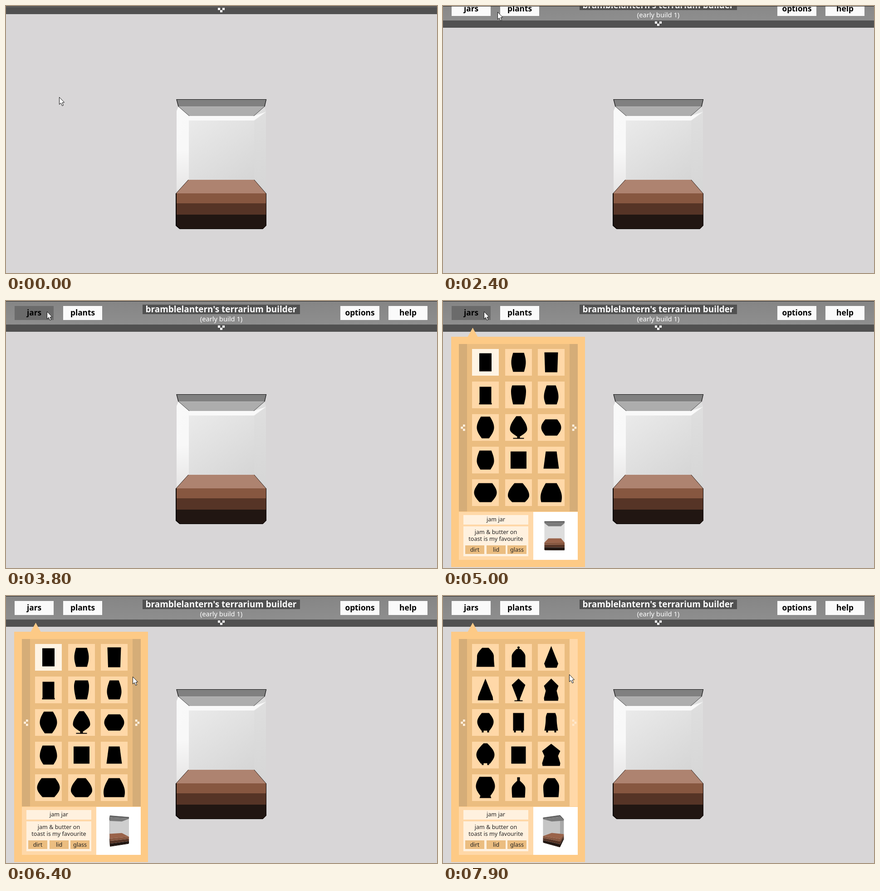
These frames come from a looping animation (950x590 px, 8 s). An HTML page with a canvas:

```html
<!DOCTYPE html>
<html lang="en">
<head>
<meta charset="utf-8">
<title>Terrarium builder</title>
<style>
html, body { margin: 0; width: 950px; height: 590px; overflow: hidden; }
canvas { display: block; }
</style>
</head>
<body>
<canvas id="stage" width="950" height="590"></canvas>
<script>
const ctx = document.getElementById('stage').getContext('2d');
const FONT = '"Noto Sans", "Open Sans", sans-serif';
const QUARTER = Math.PI / 2;

function rect(x0, y0, x1, y1, fill) {
  ctx.fillStyle = fill;
  ctx.fillRect(x0, y0, x1 - x0, y1 - y0);
}

function trace(points) {
  ctx.beginPath();
  points.forEach(([x, y]) => ctx.lineTo(x, y));
}

function poly(fill, ...points) {
  trace(points);
  ctx.closePath();
  ctx.fillStyle = fill;
  ctx.fill();
}

function line(color, width, ...points) {
  trace(points);
  ctx.strokeStyle = color;
  ctx.lineWidth = width;
  ctx.stroke();
}

function fade(x0, y0, x1, y1, ...colors) {
  const g = ctx.createLinearGradient(x0, y0, x1, y1);
  colors.forEach((c, i) => g.addColorStop(i / (colors.length - 1), c));
  return g;
}

function label(str, x, y, size, weight = 400, color = '#000') {
  ctx.font = `${weight} ${size}px ${FONT}`;
  ctx.textAlign = 'center';
  ctx.fillStyle = color;
  ctx.fillText(str, x, y);
}

// Arrowhead of three square dots, pointing along (dx, dy) from its centre
function chevron(x, y, size, dx, dy, color) {
  for (const side of [-1, 0, 1]) {
    const along = side ? -.5 : .5;
    const cx = x + size * (along * dx + side * dy), cy = y + size * (along * dy + side * dx);
    rect(cx - size / 2, cy - size / 2, cx + size / 2, cy + size / 2, color);
  }
}

// Jar parts are right-hand outlines, as [half-width, y] from the cell centre
const box = (top, bottom = top, h = 20) => [[top, -h], [bottom, h]];

function pot(neck, belly, base = neck, peak = .5, top = -21, bottom = 21) {
  const points = [];
  for (let v = 0; v <= 1.001; v += .05) {
    const w = v < peak
      ? neck + (belly - neck) * Math.sin(QUARTER * v / peak)
      : base + (belly - base) * Math.cos(QUARTER * (v - peak) / (1 - peak));
    points.push([w, top + (bottom - top) * v]);
  }
  return points;
}

const spire = (w, base, widest) => [[0, -25], [w, widest], [base, 23]];
const house = w => [[0, -25], [w, -9], [w * .75, 2], [w, 18], [w * .95, 24]];
const feet = w => [[w, 18], [w, 22], [w - 4, 22], [w - 4, 18]];
const stem = w => [[3, 20], [3, 23], [w, 23], [w, 25]];
const lip = w => [[w, 18], [w, 21]];
const knob = [[1, -24], [3, -22], [1, -19]];

const plainJars = [
  box(13.5), pot(12, 16), box(15, 13.5, 22),
  [...box(13, 13, 18), ...lip(14)], pot(14, 16.5, 12, .3), pot(10, 16, 12, .6),
  pot(10, 19, 8, .5, -24, 24), [...pot(5, 19, 3, .65, -25, 20), ...stem(12)], pot(13, 22, 13, .5, -18, 18),
  pot(13, 19, 11, .55), box(17.5, 17.5, 19), box(12, 17, 19),
  pot(15, 25, 13), pot(9, 23.5, 14, .65), pot(12, 23.5, 22, .75),
];

const fancyJars = [
  pot(7, 18.5, 20, .45), [...knob, ...pot(5, 15, 15, .4, -18, 22)], spire(15.5, 12, 14),
  spire(16, 17, 15), [...spire(15, 5, -11).slice(0, 2), ...stem(9)], house(16),
  [...pot(8, 18, 9, .5, -21, 18), ...feet(8)], [...box(12, 12, 21).slice(0, 1), [12, 18], ...feet(10)],
  [...pot(9, 12, 15, .3, -21, 18), ...feet(11)],
  [...pot(4, 20, 9, .55, -26, 20), ...feet(8)], box(16, 16, 19), house(20),
  [...pot(13, 21, 11, .5, -24, 18), [13, 23]], [[3, -23], ...pot(3, 15, 14, .45, -15, 22)], pot(8, 17.5, 16, .45),
];

const mixedJars = plainJars.map((jar, i) => i % 2 ? fancyJars[i] : jar).reverse();

function silhouette(jar, cx, cy) {
  const half = side => jar.map(([w, y]) => [cx + side * w, cy + y]);
  poly('#000', ...half(1), ...half(-1).reverse());
}

function mainJar() {
  // Glass
  poly(fade(0, 222, 0, 414, '#f9f9f9', '#f8f8f8', '#e6e5e5'),
    [380, 222], [404, 243], [403, 384], [376, 413], [376, 232]);
  poly(fade(0, 222, 0, 414, '#dfdfdf', '#d6d6d6'),
    [570, 222], [546, 243], [547, 384], [573, 413], [573, 232]);
  rect(403, 243, 547, 384, fade(420, 243, 530, 400, '#eaeaea', '#d5d5d5'));
  poly('#f9f9f9', [403, 243], [546, 243], [573, 234], [547, 253], [403, 253]);
  // Lid
  poly('#adadad', [380, 222], [570, 222], [546, 243], [404, 243]);
  poly('#808080', [376, 206], [573, 206], [570, 222], [380, 222]);
  line('#bcbcbc', 1, [381, 222.5], [569, 222.5]);
  line('#444', 1, [404, 243], [380, 222]);
  line('#444', 1, [570, 222], [546, 243]);
  line('#111', 1.2, [380, 222], [376, 206.5], [573.5, 206.5], [570, 222]);
  // Soil
  poly('#ae8370', [402, 384], [547, 384], [573, 414], [375, 414]);
  line('#2a1c16', 1, [402, 384], [375, 414]);
  line('#2a1c16', 1, [547, 384], [573, 414]);
  rect(375, 414, 574, 436, '#875740');
  rect(375, 436, 574, 461, '#563426');
  poly('#211612', [375, 461], [574, 461], [574, 485], [566, 493], [383, 493], [375, 485]);
  line('#0a0706', 2, [375, 414], [375, 485], [383, 492]);
  line('#0a0706', 1, [383, 492.5], [566, 492.5], [573.5, 485], [573.5, 414]);
}

function preview(t) {
  rect(199, 466, 297, 572, '#fff');
  const turn = t < 6400 ? 44 + (t - 5000) * 106 / 1400 : 150 + (t - 6400) * 140 / 1500;
  const angle = k => (turn + 90 * k) * Math.PI / 180;
  const point = (k, y, size = 1) => {
    const a = angle(k), r = 140 * size, s = 72.7 / (422 - r * Math.cos(a));
    return [246 + r * Math.sin(a) * s, 509 + (y - 303) * s];
  };
  const corners = [0, 1, 2, 3];
  const ring = y => corners.map(k => point(k, y));
  const front = corners.filter(k => Math.cos(angle(k + .5)) > .235);
  const band = (k, y0, y1, fill, top = 1, bottom = 1) =>
    poly(fill, point(k, y0, top), point(k + 1, y0, top), point(k + 1, y1, bottom), point(k, y1, bottom));

  for (const k of front) {
    const shade = 222 - 60 * Math.abs(Math.sin(angle(k + .5)));
    band(k, 222, 414, `rgb(${shade},${shade},${shade})`);
  }
  poly('#7a7a7a', ...ring(222));
  poly('#9a634a', ...ring(414));
  for (const k of front) {
    band(k, 206, 222, '#6e6e6e');
    band(k, 414, 436, '#875740');
    band(k, 436, 461, '#563426');
    band(k, 461, 486, '#211612');
    band(k, 485, 492, '#211612', 1, .95);
    line('#222', .8, point(k, 206), point(k + 1, 206));
  }
}

function panel(t) {
  const hover = t >= 6500;
  poly('#fdca86', [65.5, 59], [77, 80], [54, 80]);
  rect(18, 79, 313, 588, '#fdca86');
  rect(35, 95, 297, 465, '#ebbd80');
  rect(35, 95, 53, 465, '#d5ad78');
  rect(279, 95, 297, 465, hover ? '#ffd8a8' : '#d5ad78');
  chevron(44, 280, 4.7, -1, 0, '#fff1df');
  chevron(289.5, 280, 4.7, 1, 0, hover ? '#ffe8cb' : '#fff1df');

  const jars = t < 6800 ? plainJars : t < 7400 ? mixedJars : fancyJars;
  jars.forEach((jar, i) => {
    const x = Math.round(64 + 72.7 * (i % 3)), y = Math.round(106 + 72.1 * Math.floor(i / 3));
    const chosen = jars === plainJars && i === 0;
    rect(x, y, x + 59, y + 59, chosen ? '#fff4e4' : '#ffd8a8');
    silhouette(jar, x + 29.5, y + 29.5);
  });

  rect(35, 466, 297, 572, '#ffd8a8');
  rect(45, 473, 188, 494, '#fff1df');
  rect(45, 498, 188, 564, '#fff1df');
  label('jam jar', 116.5, 487, 12.6, 400, '#222');
  label('jam & butter on', 116.5, 515, 12.6, 400, '#222');
  label('toast is my favourite', 116.5, 530, 12.6, 400, '#222');
  ['dirt', 'lid', 'glass'].forEach((name, i) => {
    const x = Math.round(49 + 46.5 * i);
    rect(x, 540, x + 42, 559, '#ebbd80');
    label(name, x + 21, 554, 12.6, 400, '#222');
  });
  preview(t);
}

// The bar covers about a third of the remaining way per step, and stalls after the first
function barDrop(t) {
  if (t < 1900) return 0;
  if (t >= 2800) return 50;
  const step = t < 2400 ? 1 : (t - 2200) / 100;
  return Math.round(50 - 50 * .635 ** step);
}

function menuBar(t, hover) {
  ctx.save();
  ctx.translate(0, barDrop(t) - 50);
  rect(0, 0, 950, 52, fade(0, 0, 0, 52, '#858585', '#8e8e8e'));
  rect(0, 52, 950, 68, '#515151');
  chevron(474.5, 59, 5, 0, 1, '#fff');
  const button = (name, x, fill = '#fafafa') => {
    rect(x, 11, x + 86, 42, fill);
    label(name, x + 43, 32, 17.3, 700);
  };
  button('jars', 19, hover ? '#6b6b6b' : undefined);
  button('plants', 126);
  button('options', 737);
  button('help', 843);
  rect(301, 8, 648, 29, '#515151');
  label("bramblelantern's terrarium builder", 474, 25, 18.9, 700, '#fff');
  label('(early build 1)', 474.5, 45, 14.7, 300, '#fff');
  ctx.restore();
  rect(0, 0, 950, 1, '#282828');
}

// Each glide: start time, end time, where it ends
const glides = [
  [900, 1800, 117, 17], [2300, 2400, 120, 13], [2900, 3000, 120, 14], [3100, 3800, 90, 23],
  [5100, 6400, 279, 178], [6400, 6800, 284, 174], [7800, 7900, 278, 173],
];

function cursorAt(t) {
  let x = 117, y = 201;
  for (const [start, end, toX, toY] of glides) {
    const f = Math.min(1, Math.max(0, (t - start) / (end - start)));
    const eased = 1 - (1 - f) ** 2.56;
    x += (toX - x) * eased;
    y += (toY - y) * eased;
  }
  return [Math.round(x), Math.round(y)];
}

function cursor(x, y) {
  const arrow = [[0, 0], [0, 16], [3.6, 12.8], [6.3, 19], [9, 18], [6.5, 12], [11, 11.5], [0, 0]]
    .map(([dx, dy]) => [x + .5 + dx, y + .5 + dy]);
  poly('#fff', ...arrow);
  line('#111', 1, ...arrow);
}

function draw(now) {
  const t = Math.floor(now % 8000 / 100) * 100;
  const [x, y] = cursorAt(t);
  rect(0, 0, 950, 590, '#d8d6d7');
  mainJar();
  menuBar(t, t > 3100 && x >= 19 && x < 105 && y < 42);
  if (t >= 4300) panel(t);
  cursor(x, y);
  requestAnimationFrame(draw);
}
requestAnimationFrame(draw);
</script>
</body>
</html>
```
